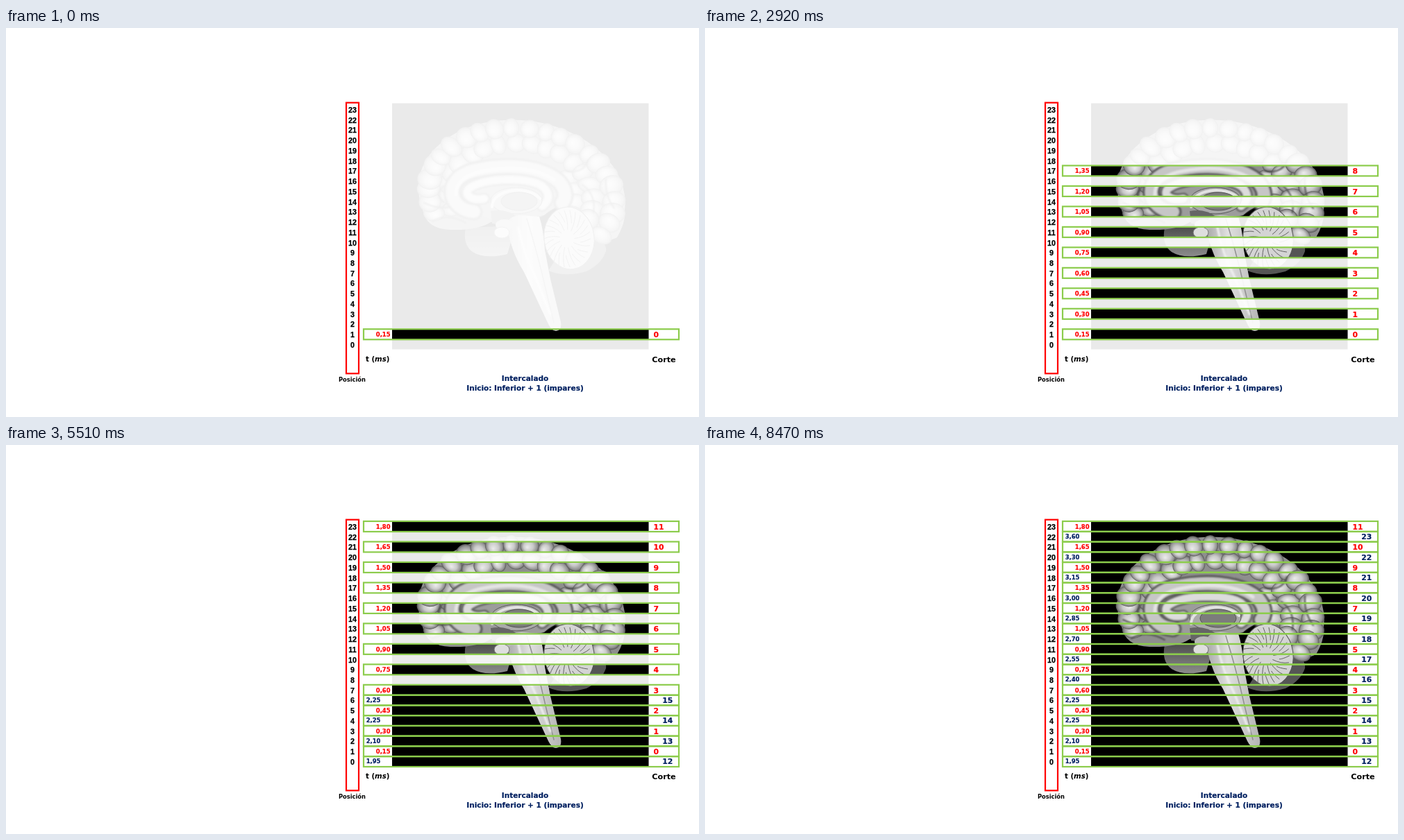
Write an HTML page that moves like this. It is 998x561 px and loops after 8840 ms.

```html
<!DOCTYPE html>
<html lang="es">
<head>
<meta charset="utf-8">
<style>
  html, body { margin: 0; width: 100%; height: 100%; overflow: hidden; background: #fff; }
  svg { display: block; }
  text { font: bold 10.5px "DejaVu Sans", sans-serif; }
  .position { font: bold 10.7px "Liberation Sans", Arial, sans-serif; text-anchor: middle; stroke: #000; stroke-width: .25px; }
  .time { font-size: 8.4px; stroke-width: .2px; }
  .slice { font-size: 10.8px; stroke-width: .2px; }
  .end { text-anchor: end; }
  .title { text-anchor: middle; fill: #002060; stroke: #002060; stroke-width: .2px; }
  .line { fill: none; stroke-linecap: round; stroke-linejoin: round; }
</style>
</head>
<body>
<svg id="stage" width="998" height="561" viewBox="0 0 998 561">
  <defs>
    <radialGradient id="gyrus" fx=".42" fy=".36">
      <stop offset="0" stop-color="#ececec"/>
      <stop offset=".5" stop-color="#cacaca"/>
      <stop offset=".84" stop-color="#929292"/>
      <stop offset="1" stop-color="#565656"/>
    </radialGradient>
    <linearGradient id="stem">
      <stop offset="0" stop-color="#a8a8a8"/>
      <stop offset=".4" stop-color="#e0e0e0"/>
      <stop offset="1" stop-color="#b4b4b4"/>
    </linearGradient>
    <linearGradient id="lobe" x2="0" y2="1">
      <stop offset="0" stop-color="#4a4a4a"/>
      <stop offset="1" stop-color="#8c8c8c"/>
    </linearGradient>
    <filter id="soft"><feGaussianBlur stdDeviation="1.3"/></filter>
    <clipPath id="revealed"></clipPath>

    <g id="brain">
      <rect x="556" y="108.5" width="369.5" height="355"/>
      <path fill="url(#lobe)" d="M662 288Q657 312 672 323Q690 334 722 326L734 285Z"/>
      <path fill="#555" d="M845 298Q866 308 864 322Q858 340 836 351Q805 360 781 350L800 320Z"/>
      <path fill="#8e8e8e" d="M600 262Q605 290 640 291Q680 292 698 280L775 270Q790 255 812 256Q845 262 852 300Q865 310 880 302Q893 280 891 262A149 108 8 0 0 594 222Q593 245 600 262Z"/>
      <g id="gyri" fill="url(#gyrus)" transform="rotate(8 742 242)"></g>
      <path fill="#9c9c9c" filter="url(#soft)" d="M672 265Q640 230 682 213Q750 196 794 228Q808 248 790 259L770 272L702 276Z"/>
      <g class="line" filter="url(#soft)">
        <g id="arch">
          <path stroke="#5c5c5c" stroke-width="25" d="M674 265C637 262 628 218 672 206C715 196 768 196 797 222C808 236 806 246 801 252"/>
          <path stroke="#c6c6c6" stroke-width="18" d="M674 265C637 262 628 218 672 206C715 196 768 196 797 222C808 236 806 246 801 252"/>
          <path stroke="#e4e4e4" stroke-width="5" d="M648 240C648 222 664 210 690 206C725 199 764 202 789 219"/>
        </g>
        <path stroke="#636363" stroke-width="17" d="M689 246C670 250 656 239 669 230C692 216 750 214 772 228C784 238 783 249 772 257"/>
        <path stroke="#dcdcdc" stroke-width="11" d="M689 246C670 250 656 239 669 230C692 216 750 214 772 228C784 238 783 249 772 257"/>
        <path stroke="#4c4c4c" stroke-width="2" d="M602 252Q622 262 640 258M614 279Q636 266 662 281M630 228Q617 240 630 251M830 226Q850 240 846 266M864 218Q862 242 876 260M806 206Q832 211 838 190"/>
      </g>
      <ellipse cx="735" cy="249" rx="37" ry="19" fill="#aaa" stroke="#585858"/>
      <path class="line" stroke="#e2e2e2" stroke-width="4" d="M700 258C700 232 750 226 769 246"/>
      <ellipse cx="739" cy="250" rx="26" ry="13" fill="#7c7c7c" stroke="#505050"/>
      <path fill="#656565" d="M698 264Q720 260 736 272L728 286L700 282Z"/>
      <path fill="url(#stem)" d="M722 284Q722 271 742 270L768 272Q774 290 776 320L784 362L799 424Q801 436 792 437Q786 437 781 427L746 352Q725 318 722 284Z"/>
      <path class="line" stroke="#8f8f8f" stroke-width="1.5" d="M750 275Q767 330 778 380L789 425"/>
      <path class="line" stroke="#f0f0f0" stroke-width="3" filter="url(#soft)" d="M738 288Q745 325 763 360L784 413"/>
      <ellipse cx="718" cy="284" rx="13" ry="8" fill="#b8b8b8"/>
      <ellipse cx="714" cy="295" rx="11" ry="8" fill="#dedede" stroke="#777"/>
      <ellipse cx="811" cy="303" rx="36" ry="45" fill="#d4d4d4" stroke="#555" transform="rotate(-8 811 303)"/>
      <path id="folia" class="line" stroke="#626262"/>
    </g>
  </defs>

  <use href="#brain" opacity=".08"/>
  <use href="#brain" clip-path="url(#revealed)"/>
  <rect x="490" y="107.7" width="18" height="390.6" fill="none" stroke="#f00" stroke-width="2.2"/>
  <text x="479" y="509.5" style="font-size:8.3px">Posición</text>
  <text x="518" y="481" style="font-size:10.2px">t (<tspan font-style="italic">ms</tspan>)</text>
  <text x="930.3" y="481.5" style="font-size:11.2px">Corte</text>
  <text class="title" x="747.5" y="508.5">Intercalado</text>
  <text class="title" x="747.5" y="523.3">Inicio: Inferior + 1 (impares)</text>
</svg>
<script>
const stage = document.getElementById("stage");
const revealed = document.getElementById("revealed");
const gyri = document.getElementById("gyri");
const SLICES = 24, STEP = 370, LOOP = 8840;
const RED = "#f00", NAVY = "#002060";

function add(parent, tag, attributes, content = "") {
  const node = document.createElementNS("http://www.w3.org/2000/svg", tag);
  for (const name in attributes) node.setAttribute(name, attributes[name]);
  node.textContent = content;
  parent.append(node);
  return node;
}

let seed = 11;
const jitter = () => (seed = seed * 16807 % 2147483647) / 2147483647 - .5;

// Rounded gyri along concentric arcs of the cerebrum.
function gyrusRing(scale, from, to, step) {
  for (let angle = from; angle <= to; angle += step) {
    const a = (angle + 3 * jitter()) * Math.PI / 180;
    const x = 742 + 149 * scale * Math.cos(a);
    const y = 242 + 108 * scale * Math.sin(a);
    const facing = Math.atan2(108 * Math.sin(a), 149 * Math.cos(a)) * 180 / Math.PI;
    add(gyri, "ellipse", {
      rx: 13 + 4 * Math.abs(Math.cos(a)) + 3 * jitter(),
      ry: 13.5 + 5 * jitter(),
      transform: `translate(${x} ${y}) rotate(${facing + 30 * jitter()})`
    });
  }
}
gyrusRing(.5, 158, 200, 20);
gyrusRing(.52, 325, 378, 17);
gyrusRing(.7, 155, 382, 13);
gyrusRing(.9, 153, 386, 10.5);

// Fine folds fanning out over the cerebellum.
let folds = "";
for (let i = 0; i < 26; i++) {
  const a = i / 26 * 2 * Math.PI;
  const at = (r, turn) => `${808 + 36 * r * Math.cos(a + turn)} ${304 + 44 * r * Math.sin(a + turn)}`;
  folds += `M${at(i % 2 ? .3 : .55, .2)}Q${at(.65, .18)} ${at(.93, 0)}`;
}
document.getElementById("folia").setAttribute("d", folds);

const rowY = row => 457 - 14.74 * row;

for (let row = 0; row < SLICES; row++)
  add(stage, "text", { class: "position", x: 499, y: rowY(row) + 3.9 }, row);

// Odd positions are acquired first, then the even ones.
const slices = Array.from({ length: SLICES }, (_, n) => {
  const odd = n < 12;
  const y = rowY(odd ? 2 * n + 1 : 2 * (n - 12));
  const textY = odd ? y : y - .6;
  const color = odd ? RED : NAVY;
  const ticks = n + (n < 15 || n === 23);
  const group = add(stage, "g", { fill: color, stroke: color });
  add(group, "rect", { x: 515, y: y - 8, width: 454, height: 15, fill: "none", stroke: "#8ccc4c", "stroke-width": 2.2 });
  add(group, "text", { class: odd ? "time end" : "time", x: odd ? 553.5 : 518.7, y: textY + 3 },
    (ticks * .15).toFixed(2).replace(".", ","));
  add(group, "text", { class: odd ? "slice" : "slice end", x: odd ? 932.5 : 960.3, y: textY + 4 }, n);
  const opening = add(revealed, "rect", { x: 556, y: y - 8, width: 370, height: 15 });
  return [group, opening];
});

let shown = -1;
function draw() {
  const count = 1 + Math.floor((performance.now() % LOOP + 40) / STEP);
  if (count !== shown) {
    shown = count;
    slices.forEach((parts, n) => parts.forEach(part => part.style.display = n < count ? "" : "none"));
  }
  requestAnimationFrame(draw);
}
draw();
</script>
</body>
</html>
```
